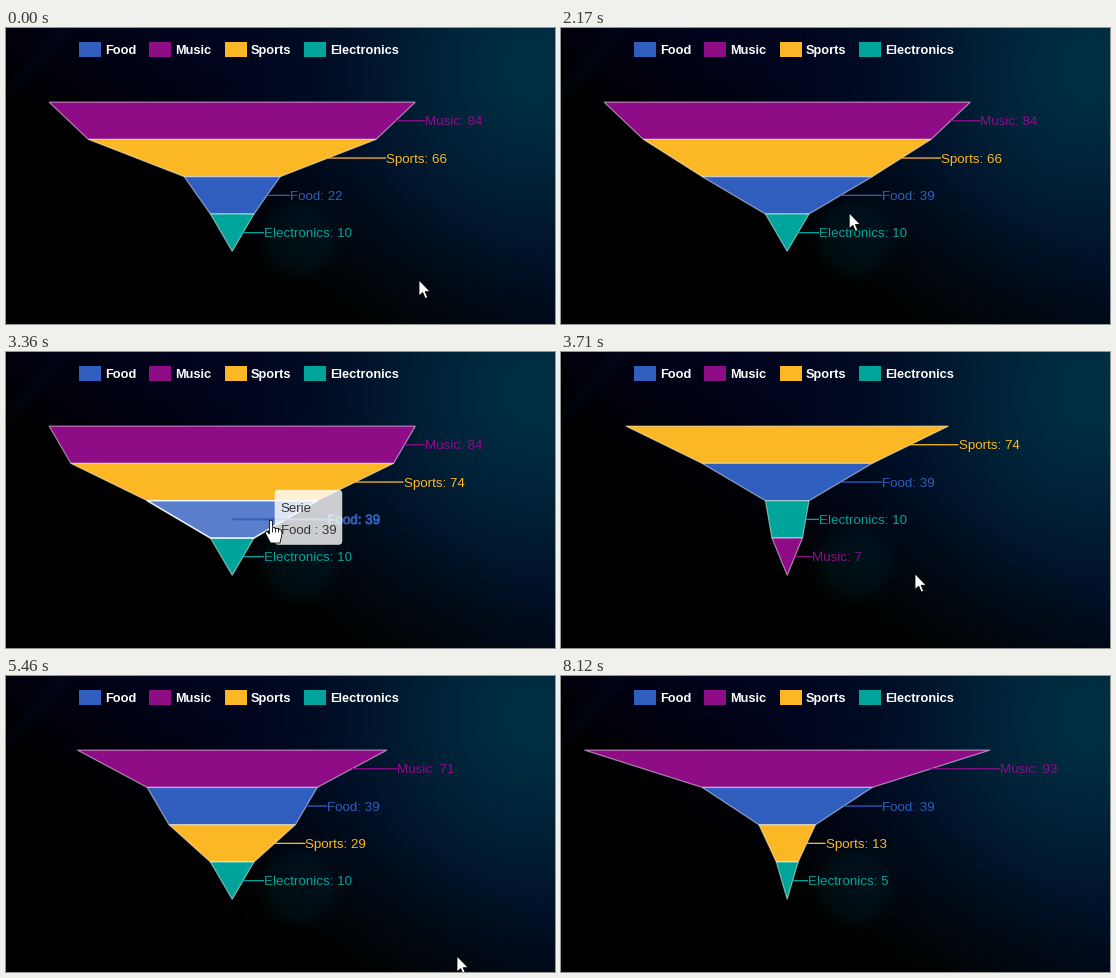
Animation of 549 by 296 pixels, one loop 8.75 s. Source, as a matplotlib script:

```python
import numpy as np
import matplotlib.pyplot as plt
from matplotlib.animation import FuncAnimation
from matplotlib.patches import FancyBboxPatch, Polygon, Rectangle
from matplotlib.patheffects import withStroke

W, H, DPI = 549, 296, 72  # at 72 dpi one point is one pixel
STEP, LOOP = 70, 8750
FONT = "Liberation Sans"

COLORS = {"Food": "#305ebe", "Music": "#8e0d87",
          "Sports": "#fbb724", "Electronics": "#00a49a"}

# Funnel: centre, top, layer height, pixels per unit
CX, TOP, ROW, UNIT = 226.2, 74.1, 37.3, 4.36

# One value changes at every tick
START = {"Music": 84, "Sports": 66, "Food": 22, "Electronics": 10}
UPDATES = [("Food", 53), ("Food", 20), ("Food", 39), ("Sports", 74),
           ("Music", 7), ("Music", 71), ("Sports", 29), ("Music", 93),
           ("Electronics", 5), ("Sports", 13)]
FIRST, TICK = 35, 895.5

# Pointer moves as (begin, end, x, y); the tooltip follows with a lag
HOME = (413, 252)
MOVES = [(2100, 2275, 218, 147), (3080, 3360, 265, 168),
         (3360, 4620, 451, 280), (7560, 7700, 456, 282),
         (7770, 7980, 460, 300)]
LAG = 175

ARROW = [(0, 0), (0, 16), (3.7, 12.6), (6.2, 18.5), (8.7, 17.5),
         (6.2, 11.7), (11.2, 11.7)]
HAND = [(-1.6, 1.2), (0, 0), (1.6, 1.2), (1.6, 7.5), (7.6, 8.8),
        (10.5, 10.3), (11, 14), (9, 23), (-0.5, 23), (-5.8, 13),
        (-4.6, 11), (-1.6, 14)]


def background():
    y, x = np.mgrid[0:H, 0:W].astype(float)
    navy = np.clip((70 + 0.6 * x - y) / 160, 0, 1)
    teal = np.exp(-((x - 530) / 180) ** 2 - ((y - 40) / 190) ** 2)
    spot = 1 / (1 + np.exp((np.hypot(x - 293, y - 210) - 35) / 4))
    streak = np.exp(-((x + 0.9 * y - 60) / 9) ** 2)
    glows = [(navy, (0, 3, 28)), (teal, (0, 43, 38)),
             (spot, (0, 12, 14)), (streak, (0, 4, 7))]
    img = sum(g[..., None] * np.array(rgb) for g, rgb in glows)
    return np.clip(img / 255, 0, 1)


def pointer(t):
    x, y = HOME
    for begin, end, x1, y1 in MOVES:
        u = np.clip((t - begin) / (end - begin), 0, 1)
        ease = 1 - (1 - u) ** 2
        x, y = x + (x1 - x) * ease, y + (y1 - y) * ease
    return x, y


def ticks(t):
    return int((t - FIRST) // TICK) + 1


def values(t):
    return {**START, **dict(UPDATES[:ticks(t)])}


def layers(t):
    """Rows from wide to narrow: name, value, top, upper and lower half width."""
    rows = sorted(values(t).items(), key=lambda item: -item[1])
    halves = [value * UNIT / 2 for _, value in rows] + [0]
    return [(name, value, TOP + i * ROW, halves[i], halves[i + 1])
            for i, (name, value) in enumerate(rows)]


def under(x, y, t):
    for name, _, top, a, b in layers(t):
        k = (y - top) / ROW
        if 0 <= k < 1 and abs(x - CX) < a + (b - a) * k:
            return name
    return None


def hovered(t):
    """Redrawn layers stay plain until the pointer moves again."""
    moved = max((begin for begin, *_ in MOVES if begin < t), default=0)
    redrawn = FIRST + (ticks(t) - 1) * TICK
    return under(*pointer(t), t) if moved > redrawn else None


def lighten(color, k=0.2):
    rgb = np.array(plt.matplotlib.colors.to_rgb(color))
    return tuple(rgb + (1 - rgb) * k)


fig = plt.figure(figsize=(W / DPI, H / DPI), dpi=DPI, facecolor="black")
ax = fig.add_axes([0, 0, 1, 1])
ax.imshow(background(), extent=(0, W, H, 0), aspect="auto", zorder=0)
ax.set(xlim=(0, W), ylim=(H, 0))
ax.axis("off")
live = []


def keep(artist):
    live.append(artist)
    return artist


def label(x, y, s, color, size=13.4, **kw):
    return ax.text(x, y, s, color=color, fontsize=size, family=FONT,
                   va="baseline", **kw)


def line(xs, ys, color, lw, z):
    keep(ax.plot(xs, ys, color=color, lw=lw, zorder=z, snap=False,
                 solid_capstyle="butt")[0])


def draw_legend():
    x = 73
    for name, color in COLORS.items():
        ax.add_patch(Rectangle((x, 14), 22, 15, fc=color, ec="none",
                               zorder=2))
        text = label(x + 26.2, 26, name, "white", 12.7, weight="bold",
                     zorder=2)
        x += text.get_window_extent().width + 39


def draw_layer(name, value, y, a, b, hot):
    color = COLORS[name]
    mid, end = y + ROW / 2, CX + a + 10
    pts = [(CX - a, y), (CX + a, y), (CX + b, y + ROW), (CX - b, y + ROW)]
    keep(ax.add_patch(Polygon(
        pts if b else pts[:3], fc=lighten(color) if hot else color,
        ec=(1, 1, 1, 0.9 if hot else 0.5), lw=1.6 if hot else 1.2,
        joinstyle="miter", zorder=4 if hot else 3)))
    line([CX if hot else CX + (a + b) / 2, end], [mid, mid], color,
         2 if hot else 1.3, 5)
    text = keep(label(end, mid + 4.6, f"{name}: {value}", color, zorder=5))
    if hot:
        text.set_path_effects([withStroke(linewidth=0.8, foreground=color)])


def draw_tooltip(t):
    x, y = pointer(t - LAG)
    name = under(x, y, t)
    if not name:
        return
    x, y = x + 22, y - 22
    value = values(t - STEP)[name]
    keep(label(x + 6, y + 22.5, "Serie", "#333333", 13.2, zorder=7))
    text = keep(label(x + 6, y + 44.5, f"{name} : {value}", "#333333", 13.2,
                      zorder=7))
    keep(ax.add_patch(FancyBboxPatch(
        (x, y), text.get_window_extent().width + 12, 55,
        boxstyle="round,pad=0,rounding_size=4", fc=(1, 1, 1, 0.8),
        ec="none", zorder=6)))


def draw_pointer(t):
    x, y = pointer(t)
    hand = under(x, y, t)
    pts = np.array(HAND if hand else ARROW) + (x, y)
    keep(ax.add_patch(Polygon(pts, fc="white", ec="black", lw=0.8,
                              zorder=8)))
    if hand:
        for dx in (1.6, 4.6, 7.6):
            line([x + dx, x + dx], [y + 8, y + 12.5], "black", 0.8, 9)


def update(frame):
    t = frame * STEP
    while live:
        live.pop().remove()
    hot = hovered(t)
    for name, *shape in layers(t):
        draw_layer(name, *shape, name == hot)
    draw_tooltip(t)
    draw_pointer(t)
    return live


draw_legend()
anim = FuncAnimation(fig, update, frames=LOOP // STEP, interval=STEP,
                     init_func=lambda: [], repeat=True, repeat_delay=0,
                     blit=False)
plt.show()
```
